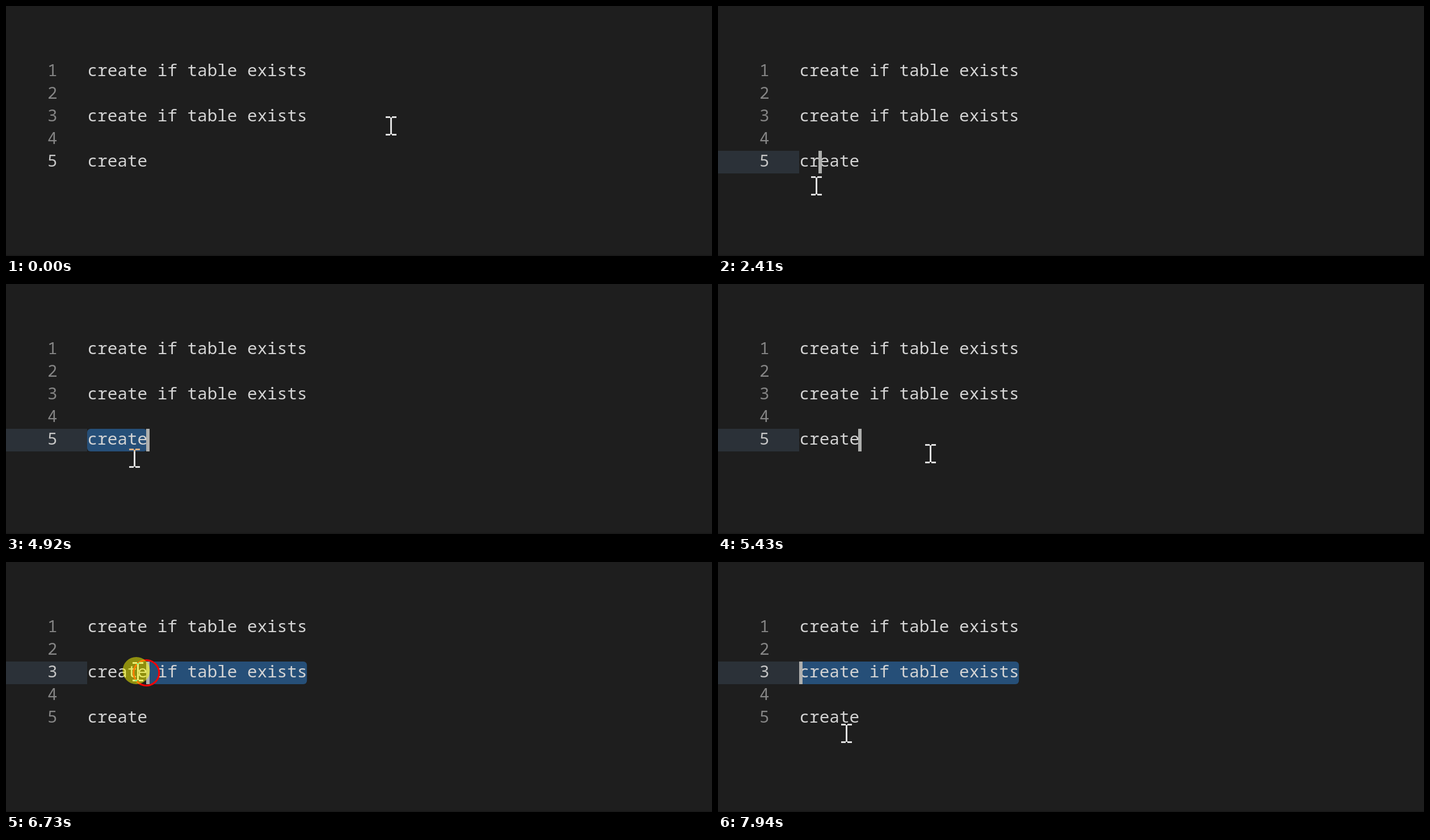
Recreate the animation shown at these times as an HTML page. Size 1244 by 442 pixels, loop 8000 ms.

```html
<!DOCTYPE html>
<html lang="en">
<head>
<meta charset="utf-8">
<title>Editor selection</title>
<style>
  html, body { margin: 0; width: 100%; height: 100%; overflow: hidden; background: #1e1e1e; }
  svg { display: block; }
  .code text { font: 29.333px "Noto Sans Mono", "DejaVu Sans Mono", monospace; fill: #d4d4d4; }
  .code .num { fill: #858585; }
  .code .num.on { fill: #c6c6c6; }
  .label { font: 50px Roboto, "Open Sans", sans-serif; fill: #f0f0f0; text-anchor: middle; }
  #mouse { mix-blend-mode: difference; }
</style>
</head>
<body>
<svg width="1244" height="442" viewBox="0 0 1244 442">
  <rect width="1244" height="442" fill="#1e1e1e"/>
  <rect y="440" width="1244" height="2" fill="#191919"/>
  <rect id="gutter" width="143" height="40" fill="#2b3138"/>
  <rect id="sel" height="40" rx="6" fill="#264f78"/>
  <g class="code" id="code"></g>
  <rect id="caret" width="6" height="40" fill="#aeafad"/>
  <g id="keys">
    <rect y="324" width="1244" height="84" fill="#000" opacity=".45"/>
    <rect x="573" y="332" width="154" height="68" rx="9" fill="#646464"/>
    <rect x="575" y="334" width="150" height="58" rx="7" fill="#1b1b1b"/>
    <text class="label" x="650" y="386">Alt+Y</text>
  </g>
  <circle id="ring" r="22.5" fill="none" stroke="#f00" stroke-width="3"/>
  <path id="mouse" fill="#fff" shape-rendering="crispEdges"
    d="M-9-17h8v3h-8zM2-17h8v3h-8zM-1-15h3v30h-3zM-9 14h8v3h-8zM2 14h8v3h-8z"/>
  <circle id="glow" r="24" fill="#ff0" opacity=".5"/>
</svg>
<script>
const LOOP = 8000, FRAME = 100, BLINK = 495;
const LEFT = 143, CHAR = 17.6, ROW = 40;
const PHRASE = "create if table exists", WORD = "create";

// moments at which the user acts
const CLICK = 1920, EXPAND = 3600, KEY_UP = 4410, CLEAR = 5120;
const DRAG = 6430, DRAG_END = 6930, RELEASE = 7230;

// pointer glides: first step, last step, end x, end y
const glides = [
  [300, 1100, 170, 285], [1200, 1400, 190, 269],
  [CLICK, CLICK, 184, 279], [2020, 2210, 229, 359], [2310, 2410, 173, 318],
  [4610, 4920, 226, 308], [5020, 5330, 369, 303], [5430, 6330, 556, 199],
  [DRAG, 6730, 232, 194], [6830, DRAG_END, 133, 194],
  [RELEASE, 7340, 232, 308], [7450, 7450, 226, 303]
];

const $ = id => document.getElementById(id);
const rowTop = line => 56 + line * ROW;
const ease = p => p * p * (3 - 2 * p);
const colAt = x => Math.max(0, Math.min(PHRASE.length, Math.round((x - LEFT) / CHAR)));

function set(el, attrs) {
  for (const name in attrs) el.setAttribute(name, attrs[name]);
}
const show = (el, on) => set(el, { visibility: on ? "visible" : "hidden" });

function mouseAt(t) {
  let x = 678, y = 212;
  for (const [t0, t1, ex, ey] of glides) {
    if (t < t0) break;
    const gaps = Math.round((t1 - t0) / FRAME);
    const passed = gaps ? Math.floor((t - t0) / (t1 - t0) * gaps + 1e-6) : 0;
    const p = ease(Math.min(1, (passed + 1) / (gaps + 1)));
    x += (ex - x) * p;
    y += (ey - y) * p;
  }
  return [Math.round(x), Math.round(y)];
}

// active line, selected columns and the time the caret last moved
function editAt(t, x) {
  if (t >= DRAG) {
    const to = t < DRAG_END ? colAt(x) : 0;
    return { line: 3, from: PHRASE.length, to, moved: Math.min(t, DRAG_END) };
  }
  const end = WORD.length;
  if (t >= CLEAR) return { line: 5, from: end, to: end, moved: CLEAR };
  if (t >= EXPAND) return { line: 5, from: 0, to: end, moved: EXPAND };
  return { line: 5, from: 2, to: 2, moved: CLICK };
}

function keyOpacity(t) {
  if (t < EXPAND || t >= KEY_UP) return 0;
  return Math.min(1, .2 + .4 * Math.floor((t - EXPAND) / 105));
}

function addText(x, line, text, cls) {
  const el = document.createElementNS("http://www.w3.org/2000/svg", "text");
  set(el, { x, y: rowTop(line) + 28, class: cls });
  el.textContent = text;
  $("code").append(el);
  return el;
}

const numbers = [PHRASE, "", PHRASE, "", WORD].map((text, i) => {
  addText(LEFT + .5, i + 1, text, "");
  return addText(73, i + 1, i + 1, "num");
});

function draw(t) {
  const [mx, my] = mouseAt(t);
  const trail = mx + (mouseAt(t - FRAME)[0] - mx) * .3;
  const down = t >= CLICK && t < CLICK + FRAME || t >= DRAG && t < RELEASE;
  const { line, from, to, moved } = editAt(t, trail);
  const y = rowTop(line), focused = t >= CLICK;

  numbers.forEach((el, i) => el.classList.toggle("on", i + 1 === line));
  set($("gutter"), { y });
  show($("gutter"), focused);
  set($("sel"), { x: LEFT + Math.min(from, to) * CHAR, y, width: Math.abs(to - from) * CHAR });
  set($("caret"), { x: Math.max(LEFT, Math.floor(LEFT - 1 + to * CHAR)), y });
  show($("caret"), focused && Math.floor((t - moved) / BLINK) % 2 === 0);
  set($("keys"), { opacity: keyOpacity(t) });

  set($("mouse"), { transform: `translate(${mx} ${my})` });
  set($("ring"), { cx: trail, cy: my + 2 });
  set($("glow"), { cx: mx - 2.5, cy: my - 2 });
  show($("ring"), down);
  show($("glow"), down);
}

const start = performance.now();
function tick() {
  draw((performance.now() - start) % LOOP);
  requestAnimationFrame(tick);
}
tick();
</script>
</body>
</html>
```
